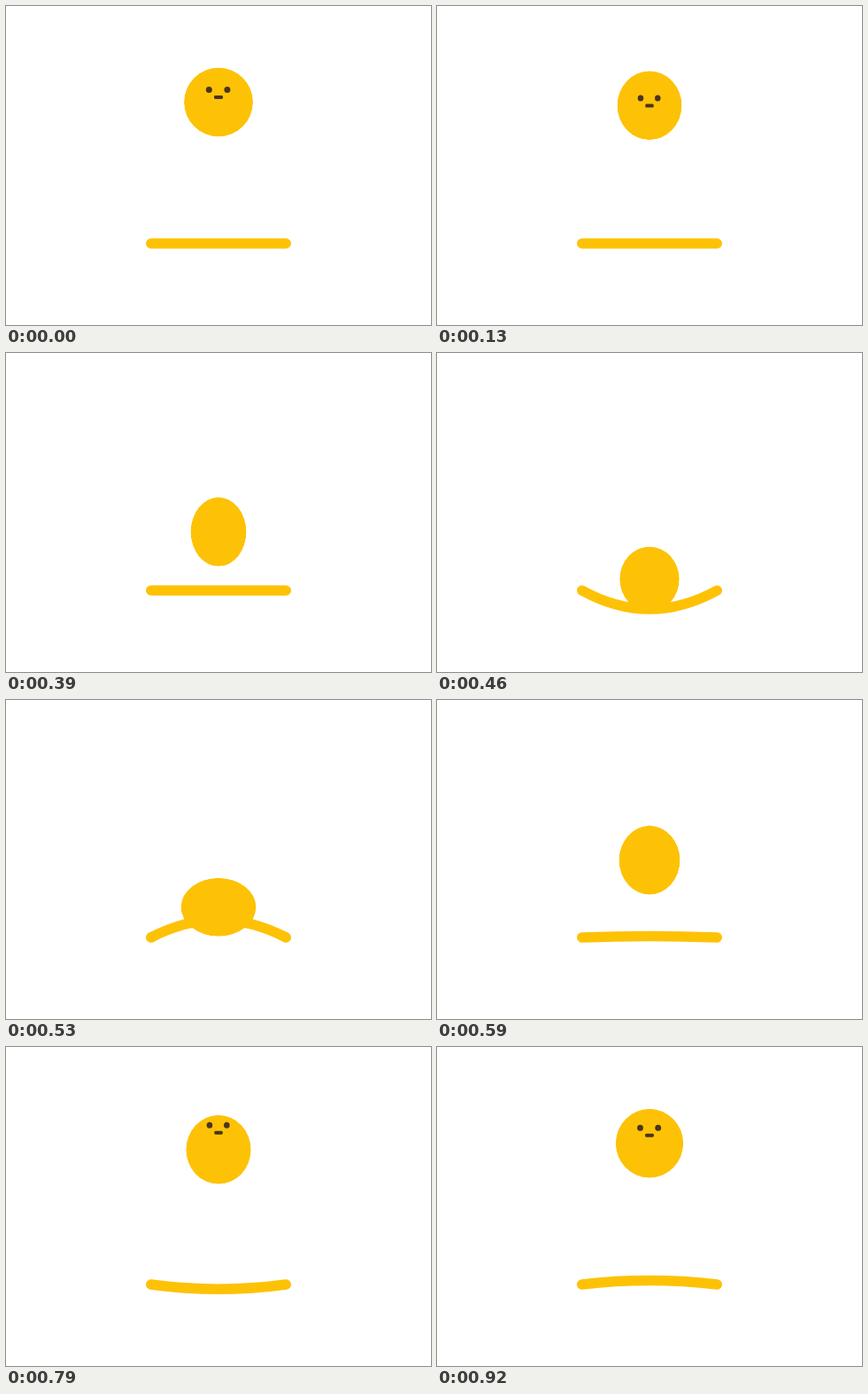
An HTML page that plays this animation: 480 px wide and 360 px high, repeating every 0.99 s.

```html
<!DOCTYPE html>
<html lang="en">
<head>
<meta charset="utf-8">
<title>Bouncing ball</title>
<style>
  html, body { margin: 0; width: 100%; height: 100%; overflow: hidden; background: #fff; }
  svg { display: block; width: 100%; height: 100%; }
</style>
</head>
<body>
<svg viewBox="0 0 480 360">
  <defs>
    <clipPath id="inside"><circle r="39"/></clipPath>
  </defs>
  <path id="bar" fill="none" stroke="#fdc205" stroke-width="11.6" stroke-linecap="round"/>
  <g id="ball" clip-path="url(#inside)">
    <circle r="39" fill="#fdc205"/>
    <g id="face" fill="#4a3420">
      <circle cx="-10.7" cy="-14" r="3.5"/>
      <circle cx="9.9" cy="-14" r="3.5"/>
      <rect x="-5" y="-7.5" width="10" height="4" rx="1.4"/>
    </g>
  </g>
</svg>
<script>
const LOOP = 990, STEPS = 15, STEP = LOOP / STEPS, HIT = 7;
const REST_Y = 108.5, RADIUS = 39, BAR_Y = 268, MAX_SAG = 21;
const [bar, ball, face] = ['bar', 'ball', 'face'].map(id => document.getElementById(id));

// Ball pose on the way down, n steps after the top
const fall = n => ({ drop: 0.49 * n ** 2.93, roll: 0.727 * n ** 3, narrow: 1.25 * n });

// Ball pose on the way up, n steps before the top
const rise = n => ({ drop: 0.25 * n ** 3 + 0.00235 * n ** 5, roll: -n * (3.1 + 0.48 * n), narrow: 0.75 * n });

// Damped spring, limited by how far the ball can push the bar
function sag(sinceHit) {
  if (sinceHit < 0) return 0;
  return Math.min(MAX_SAG, 38.6 * 0.75 ** sinceHit * Math.cos(2.32 * sinceHit));
}

function draw(time) {
  // The motion is shown as fifteen held poses per loop
  const step = Math.floor((time % LOOP + 5) / STEP) % STEPS;
  const { drop, roll, narrow } = step <= HIT ? fall(step) : rise(STEPS - step);
  const squash = Math.max(0, 1 - Math.abs(step - HIT - 0.8) / 1.2);
  const scaleX = 1 - (narrow - 10.5 * squash) / RADIUS;
  const scaleY = 1 - 7.2 * squash / RADIUS;

  ball.setAttribute('transform', `translate(240 ${REST_Y + drop}) scale(${scaleX} ${scaleY})`);
  face.setAttribute('transform', `translate(0 ${roll})`);
  bar.setAttribute('d', `M163.8 ${BAR_Y}Q240 ${BAR_Y + 2 * sag(step - HIT)} 316.2 ${BAR_Y}`);
}

const start = performance.now();
function tick() {
  draw(performance.now() - start);
  requestAnimationFrame(tick);
}
tick();
</script>
</body>
</html>
```
